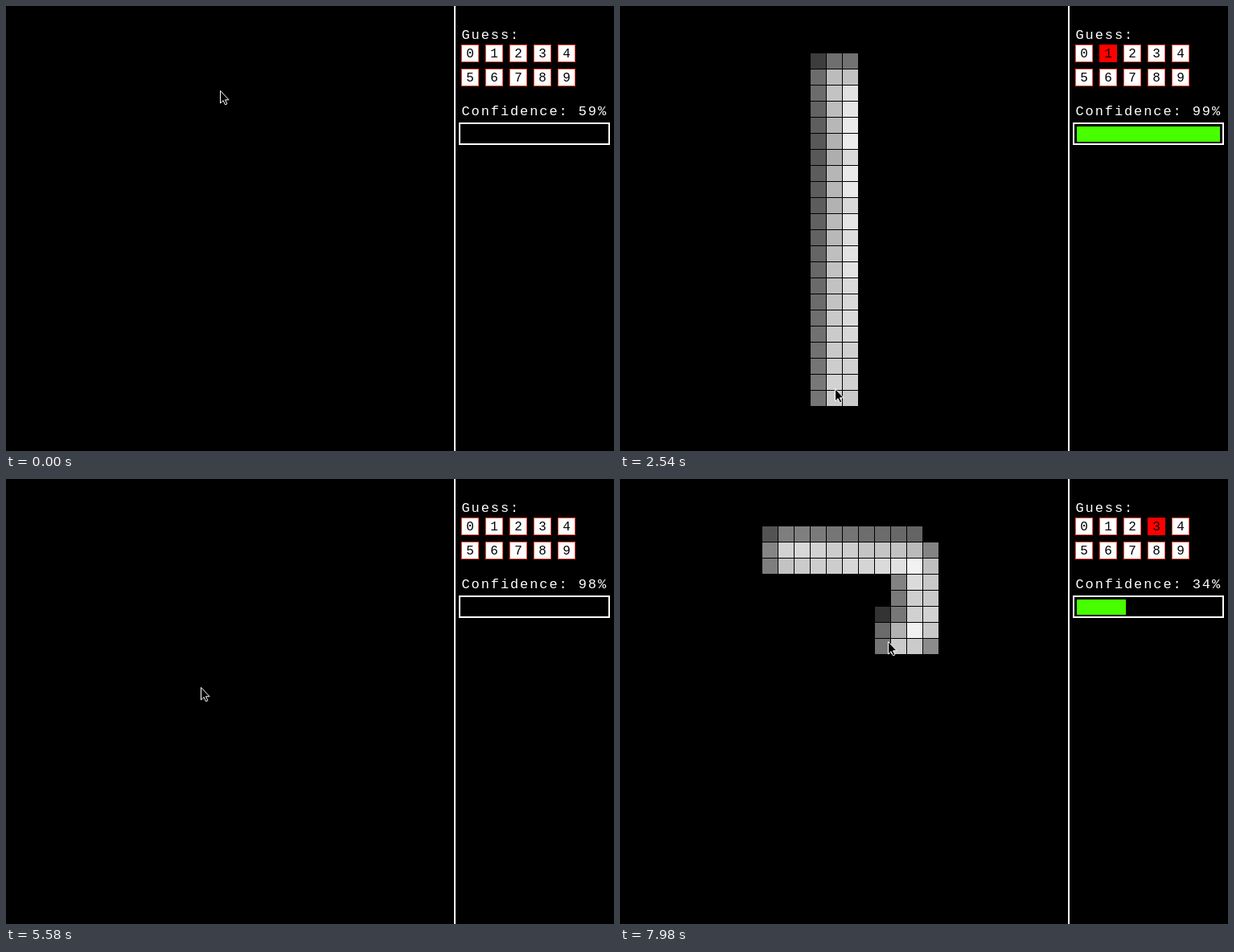
Recreate the animation shown at these times as an HTML page. Size 756 by 554 pixels, loop 8 s.

```html
<!DOCTYPE html>
<html lang="en">
<head>
<meta charset="utf-8">
<title>Digit guesser</title>
<style>
  html, body { margin: 0; width: 100%; height: 100%; overflow: hidden; background: #000; }
  svg { display: block; width: 756px; height: 554px; }
  text { font-family: "Liberation Mono", "DejaVu Sans Mono", monospace; }
  .label { font-size: 17px; letter-spacing: 1.9px; fill: #fff; white-space: pre; }
  .digit { font-size: 16px; text-anchor: middle; }
</style>
</head>
<body>
<svg id="stage" viewBox="0 0 756 554">
  <rect width="756" height="554"/>
  <g id="cells" shape-rendering="crispEdges"></g>
  <rect x="557" width="2" height="554" fill="#fff"/>
  <text class="label" x="566.5" y="41">Guess:</text>
  <g id="buttons"></g>
  <text class="label" id="label" x="566.5" y="136"></text>
  <rect x="564" y="146" width="186" height="26" fill="none" stroke="#fff" stroke-width="2"/>
  <rect id="bar" x="568" y="150" height="19" fill="#48ff00" shape-rendering="crispEdges"/>
  <path id="cursor" d="M0 0V15.5L3.6 12.2L6 17.4L8.4 16.3L6 11.3H10.6Z" stroke="#fff"/>
</svg>
<script>
const LOOP = 8000, CELL = 20, LEFT = -3, TOP = -1;
const $ = id => document.getElementById(id);

function add(parent, tag, attrs) {
  const node = document.createElementNS("http://www.w3.org/2000/svg", tag);
  for (const key in attrs) node.setAttribute(key, attrs[key]);
  return parent.appendChild(node);
}

// Three steps per 140 ms, lasting 20, 100 and 20 ms.
function stepAt(ms) {
  const phase = ms % 140;
  return 3 * Math.floor(ms / 140) + (phase < 20 ? 0 : phase < 120 ? 1 : 2);
}

// Pointer path: step, x, y
const path = [
  [0, 266, 105], [10, 268, 89], [16, 270, 93], [26, 274, 156], [33, 272, 262],
  [50, 267, 459], [55, 267, 476], [60, 267, 480], [72, 268, 479], [86, 600, 76],
  [93, 657, 66], [106, 268, 461], [109, 269, 457], [124, 228, 160], [134, 211, 80],
  [137, 209, 77], [139, 209, 77], [146, 203, 87], [148, 203, 87], [160, 351, 93],
  [163, 364, 104], [168, 368, 171], [170, 347, 193], [171, 333, 202]
];

// Network output: step, confidence, guessed digit (none while the canvas is empty)
const output = [
  [0, 59], [10, 35, 7], [20, 37, 5], [30, 44, 1], [46, 99, 1], [76, 98, 1],
  [115, 98], [150, 25, 7], [157, 30, 2], [166, 33, 3], [171, 34, 3]
];

// Steps with the button down, and the step at which the canvas is cleared
const strokes = [
  { from: 10, to: 72, clear: 115 },
  { from: 148, to: 171, clear: Infinity }
];

// Finds the key at or before a step, the next one, and the fraction between them.
function between(keys, step) {
  let i = 0;
  while (i < keys.length - 2 && keys[i + 1][0] <= step) i++;
  const a = keys[i], b = keys[i + 1];
  return { a, b, f: Math.min(1, (step - a[0]) / (b[0] - a[0])) };
}

const mix = (a, b, f) => a + (b - a) * f;

function pointerAt(step) {
  const { a, b, f } = between(path, step);
  return [mix(a[1], b[1], f), mix(a[2], b[2], f)];
}

function outputAt(step) {
  const { a, b, f } = between(output, step);
  if (f === 1) return { guess: b[2], confidence: b[1] };
  const held = a[2] === undefined;
  return { guess: a[2], confidence: Math.round(held ? a[1] : mix(a[1], b[1], f)) };
}

// Each dab lights 3 by 3 cells by the distance from the pointer to a cell's corner.
function dab(levels, x, y) {
  const col = Math.floor((x - LEFT) / CELL), row = Math.floor((y - TOP) / CELL);
  for (let r = row - 1; r <= row + 1; r++) {
    for (let c = col - 1; c <= col + 1; c++) {
      const left = LEFT + c * CELL, top = TOP + r * CELL, key = left + "," + top;
      const level = Math.max(40, Math.round(255 - 4.5 * Math.hypot(x - left, y - top)));
      levels.set(key, Math.max(level, levels.get(key) || 0));
    }
  }
}

function drawCells(step) {
  const levels = new Map();
  for (const { from, to, clear } of strokes) {
    if (step >= clear) continue;
    for (let s = from; s <= to && s < step; s++) dab(levels, ...pointerAt(s));
  }
  $("cells").replaceChildren();
  for (const [key, level] of levels) {
    const [x, y] = key.split(",");
    add($("cells"), "rect", {
      x, y, width: CELL - 1, height: CELL - 1, fill: `rgb(${level},${level},${level})`
    });
  }
}

const buttons = Array.from({ length: 10 }, (_, digit) => {
  const x = 566 + 30 * (digit % 5), y = 48 + 30 * Math.floor(digit / 5);
  const box = add($("buttons"), "rect", { x: x + .5, y: y + .5, width: 21, height: 21 });
  add($("buttons"), "text", { class: "digit", x: x + 11, y: y + 15.5 }).textContent = digit;
  return box;
});

function draw(step) {
  drawCells(step);
  const { guess, confidence } = outputAt(step);
  buttons.forEach((box, i) => {
    box.setAttribute("fill", i === guess ? "#f00" : "#fff");
    box.setAttribute("stroke", i === guess ? "#f00" : "#ff5040");
  });
  $("label").textContent = `Confidence: ${confidence}%`;
  $("bar").setAttribute("width", guess === undefined ? 0 : Math.round(confidence * 1.8));
  const [x, y] = pointerAt(step).map(Math.round);
  $("cursor").setAttribute("transform", `translate(${x + .5} ${y + .5})`);
}

const start = performance.now();
let shown = -1;
function tick() {
  const step = stepAt((performance.now() - start) % LOOP);
  if (step !== shown) draw(shown = step);
  requestAnimationFrame(tick);
}
tick();
</script>
</body>
</html>
```
